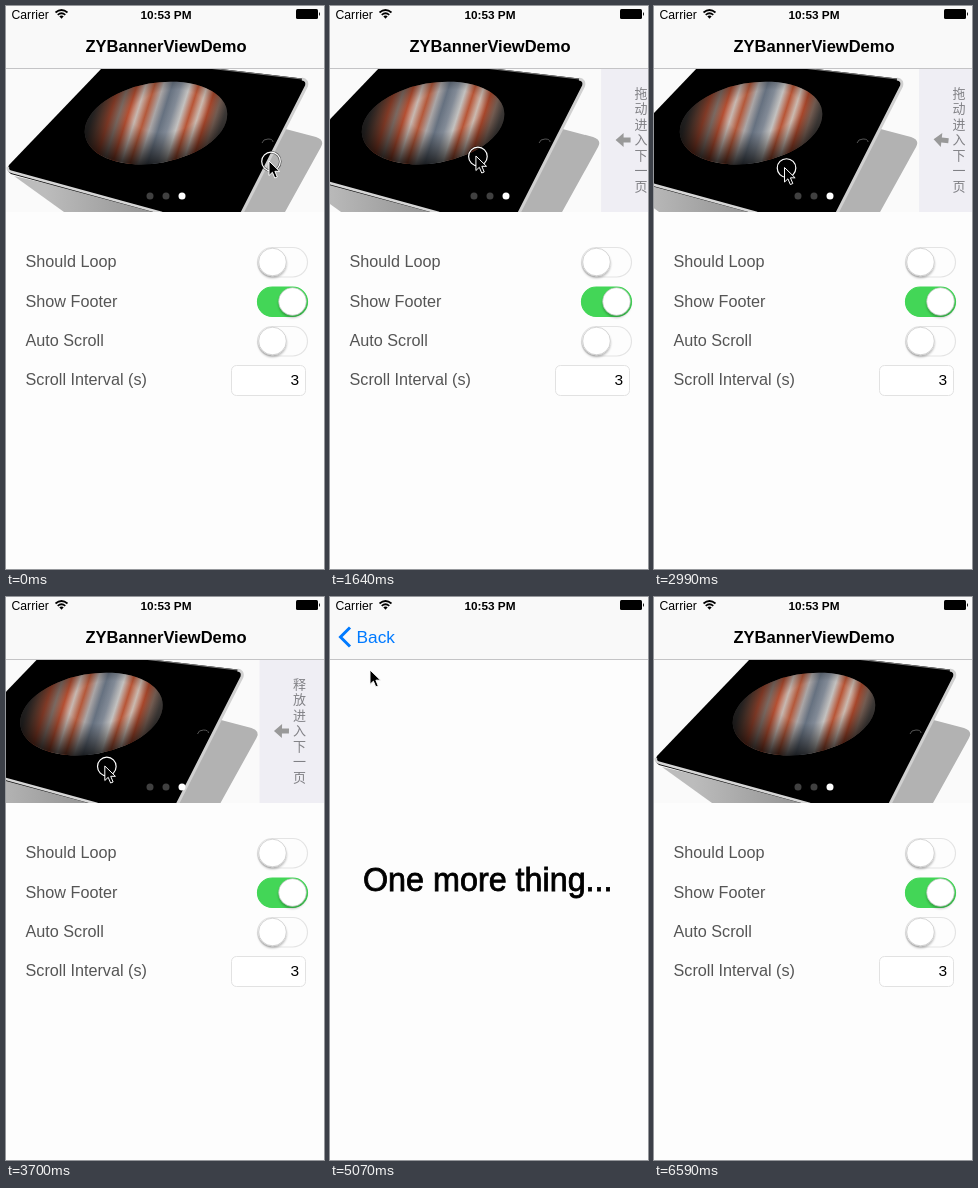
These frames come from a looping animation (318 by 563 pixels, 7220 ms). An HTML page:

```html
<!DOCTYPE html>
<html lang="en">
<head>
<meta charset="utf-8">
<title>ZYBannerViewDemo</title>
<style>
  html, body { margin: 0; width: 100%; height: 100%; overflow: hidden; background: #fdfdfd; }
  svg { display: block; font-family: "Liberation Sans", Arial, sans-serif; }
  .label { font-size: 16.2px; fill: #555; }
  .cjk { font: 13px "Noto Sans CJK SC", "Noto Sans CJK", sans-serif; fill: #808085; text-anchor: middle; }
  .blue { fill: #007aff; font-size: 17.3px; }
</style>
</head>
<body>
<svg id="stage" width="318" height="563" viewBox="0 0 318 563">
  <defs>
    <linearGradient id="bands" gradientUnits="userSpaceOnUse" x1="94" y1="88" x2="206" y2="146"></linearGradient>
    <radialGradient id="shade" cx=".6" cy=".38" r=".64">
      <stop offset=".4" stop-color="#000" stop-opacity=".08"/>
      <stop offset="1" stop-color="#000" stop-opacity=".75"/>
    </radialGradient>
    <linearGradient id="floor">
      <stop offset=".2" stop-color="#bcbcbc"/>
      <stop offset="1" stop-color="#8c8c8c"/>
    </linearGradient>
    <linearGradient id="edge">
      <stop offset="0" stop-color="#000" stop-opacity=".05"/>
      <stop offset="1" stop-color="#000" stop-opacity=".14"/>
    </linearGradient>
    <clipPath id="bannerClip"><rect y="62" width="318" height="144"/></clipPath>
    <filter id="soft" x="-30%" y="-30%" width="160%" height="170%">
      <feDropShadow dx="0" dy="2" stdDeviation="1.3" flood-color="#000" flood-opacity=".28"/>
    </filter>
  </defs>

  <g id="home">
    <rect width="318" height="563" fill="#fdfdfd"/>
    <g clip-path="url(#bannerClip)">
      <rect y="62" width="318" height="144" fill="#fafafa"/>
      <g id="slide">
        <path d="M272 121L310 131Q319 134 315 141L279 206H235Z" fill="#b2b2b2"/>
        <path d="M8 170L58 206H165Z" fill="url(#floor)"/>
        <path d="M96 62H206L296 72.500Q303 74 301 80L237 206H147L5 168Q0 165 3 159Z" fill="#000"/>
        <path d="M2 161Q1 165 6 166L156 207" fill="none" stroke="#d6d6d6" stroke-width="2.600"/>
        <path d="M206 62.500L296 73" fill="none" stroke="#777"/>
        <path d="M296 73Q302 74 300.500 80L236 207" fill="none" stroke="#d0d0d0" stroke-width="3"/>
        <g transform="rotate(-10 150 117)">
          <ellipse cx="150" cy="117" rx="72" ry="40" fill="url(#bands)"/>
          <ellipse cx="150" cy="117" rx="72" ry="40" fill="url(#shade)"/>
        </g>
        <path d="M256 137Q257 133 262 133T267 136" fill="none" stroke="#555" stroke-width="1"/>
      </g>
      <g id="footer">
        <rect x="318" y="62" width="318" height="144" fill="#efeef4"/>
        <path id="arrow" d="M-7.500 0L.5-7V-2.500H7.500V2.500H.5V7Z" fill="#999"/>
        <g id="hint"></g>
      </g>
      <circle cx="144" cy="190" r="3.500" fill="#fff" fill-opacity=".25"/>
      <circle cx="160" cy="190" r="3.500" fill="#fff" fill-opacity=".25"/>
      <circle cx="176" cy="190" r="3.500" fill="#fff"/>
    </g>
    <g id="rows"></g>
    <rect x="225.500" y="359.500" width="74" height="30" rx="5" fill="#fff" stroke="#e2e2e2"/>
    <text x="293" y="379" font-size="15.500" text-anchor="end">3</text>
  </g>
  <rect id="dim" width="318" height="563"/>

  <g id="next">
    <rect x="-6" width="6" height="563" fill="url(#edge)"/>
    <rect width="318" height="563" fill="#fdfdfd"/>
    <text x="33" y="293.500" font-size="32.300" stroke="#000" stroke-width=".8">One more thing...</text>
  </g>

  <rect width="318" height="62" fill="#f9f9f9"/>
  <rect y="62" width="318" height="1" fill="#c4c4c6"/>
  <text id="title" x="160" y="46" font-size="16.500" font-weight="bold" text-anchor="middle">ZYBannerViewDemo</text>
  <g id="back">
    <path d="M20 30.500L10.500 40L20 49.500" fill="none" stroke="#007aff" stroke-width="3"/>
    <text id="backText" class="blue" x="26.500" y="46">Back</text>
  </g>

  <text x="5.500" y="12.500" font-size="12.200">Carrier</text>
  <path d="M49.500 6.500Q55.500 1.500 61.500 6.500M51.700 8.800Q55.500 5.700 59.300 8.800"
    fill="none" stroke="#000" stroke-width="1.700"/>
  <path d="M53.300 10.300Q55.500 8.600 57.700 10.300L55.500 12.700Z"/>
  <text x="160" y="12.500" font-size="11.800" font-weight="bold" text-anchor="middle">10:53 PM</text>
  <rect x="290" y="3" width="22" height="10" rx="1.500"/>
  <path d="M313 6Q315 8 313 10Z"/>

  <g id="pointer">
    <g id="press" fill="none">
      <circle cx="2" cy="0.500" r="9.300" stroke="#000" stroke-opacity=".55" stroke-width="2.600"/>
      <circle cx="2" cy="0.500" r="9.300" stroke="#fff" stroke-width="1.200"/>
    </g>
    <path d="M0 0V14.500L3.400 11.300L5.800 17L8.300 16L5.900 10.300H10.600Z" fill="#000" stroke="#fff"/>
  </g>
</svg>

<script>
const LOOP = 7220, W = 318;
const $ = id => document.getElementById(id);
const clamp = v => Math.max(0, Math.min(1, v));
const smooth = v => { v = clamp(v); return v * v * (3 - 2 * v); };
const move = (id, x, y = 0) => $(id).setAttribute('transform', `translate(${x} ${y})`);
const fade = (id, v) => $(id).setAttribute('opacity', v);

// Planet: soft diagonal bands
const tones = ['#4f4b4a', '#8a5a48', '#c4583a', '#a08a80', '#d05a38', '#d8c8c0', '#c4603f',
  '#b9b4b4', '#6f7b8b', '#8d96a3', '#d4d2d0', '#c85c3a', '#dccabf', '#c05030', '#97786a', '#5b5552'];
$('bands').innerHTML = tones.map((c, i) =>
  `<stop offset="${i / (tones.length - 1)}" stop-color="${c}"/>`).join('');

// Settings rows
const toggle = (y, on) => `
  <rect x="251.500" y="${y - 14.5}" width="50" height="29.500" rx="14.700"
    fill="${on ? '#43d657' : '#fdfdfd'}" stroke="${on ? '#43d657' : '#e4e4e4'}" stroke-width="1.200"/>
  <circle cx="${on ? 286.5 : 266.5}" cy="${y}" r="13.800" fill="#fff" stroke="#bbb" stroke-width=".6" filter="url(#soft)"/>`;
$('rows').innerHTML = [
  ['Should Loop', 256, false], ['Show Footer', 295.5, true],
  ['Auto Scroll', 335, false], ['Scroll Interval (s)', 374]
].map(([name, y, on]) =>
  `<text class="label" x="19.500" y="${y + 5}">${name}</text>` + (on === undefined ? '' : toggle(y, on))).join('');

const hints = ['拖动进入下一页', '释放进入下一页'].map(s =>
  [...s].map((c, i) => `<text class="cjk" x="358" y="${91.5 + i * 15.5}">${c}</text>`).join(''));

// Pointer tip: time, x, y
const path = [
  [0, 263, 155], [740, 263, 155], [1460, 164, 151], [1640, 146, 150], [2150, 104, 151],
  [2480, 98, 152], [2580, 97, 153], [2930, 129, 160], [3050, 132, 163], [3250, 129, 166],
  [3700, 99, 169], [3940, 55, 170], [4160, 18, 170], [4500, 14, 165], [5070, 40, 73],
  [5180, 38, 61], [5340, 36, 34], [5800, 36, 34], [6290, 287, 522], [6450, 287, 522],
  [6585, 299, 575], [LOOP, 299, 575]
];
function pointerAt(t) {
  const i = Math.max(1, path.findIndex(k => k[0] > t));
  const [t0, x0, y0] = path[i - 1], [t1, x1, y1] = path[i];
  const k = (t - t0) / (t1 - t0);
  return [x0 + (x1 - x0) * k, y0 + (y1 - y0) * k];
}

// Rubber-band pull, then spring back after release
const RELEASE = 3940;
function pullAt(t) {
  const d = Math.max(0, 263 - pointerAt(Math.min(t, RELEASE))[0] - 17);
  const pull = W * (1 - 1 / (d * 0.55 / W + 1));
  return pull * (1 - smooth((t - RELEASE) / 160));
}

const spring = ms => {
  const a = Math.max(0, ms) * 0.01826;
  return 1 - (1 + a) * Math.exp(-a);
};
const PUSH = 4104, POP = 5760;
const pushAt = t => t < POP ? (t > PUSH + 560 ? 1 : spring(t - PUSH))
                            : (t > POP + 530 ? 0 : 1 - spring(t - POP));

const ARM = [2130, 3690], DISARM = 2760;
const turnAt = t => smooth((t - ARM[0]) / 260) - smooth((t - DISARM) / 260) + smooth((t - ARM[1]) / 260);
const armedAt = t => (t >= ARM[0] && t < DISARM) || (t >= ARM[1] && t < PUSH);
const pressedAt = t => t < 60 || (t >= 480 && t < RELEASE) || (t >= 5640 && t < POP);

let shownHint = -1;
function draw(t) {
  const pull = pullAt(t), p = pushAt(t);
  move('slide', -pull);
  move('footer', -pull);
  $('arrow').setAttribute('transform', `translate(340 134) rotate(${180 * turnAt(t)})`);
  const hint = +armedAt(t);
  if (hint !== shownHint) $('hint').innerHTML = hints[shownHint = hint];

  move('home', -0.305 * W * p);
  fade('dim', 0.08 * p);
  move('next', W * (1 - p));
  $('next').style.display = p > 0 ? '' : 'none';

  move('title', -39 * p);
  fade('title', clamp(1 - 1.85 * p));
  const held = t >= 5640 && t < POP ? 0.3 : 1;
  fade('back', clamp(2 * p - 1) * held);
  move('backText', 60 * (1 - p));

  move('pointer', ...pointerAt(t));
  fade('press', +pressedAt(t));
}

const start = performance.now();
function tick() {
  draw((performance.now() - start) % LOOP);
  requestAnimationFrame(tick);
}
tick();
</script>
</body>
</html>
```
